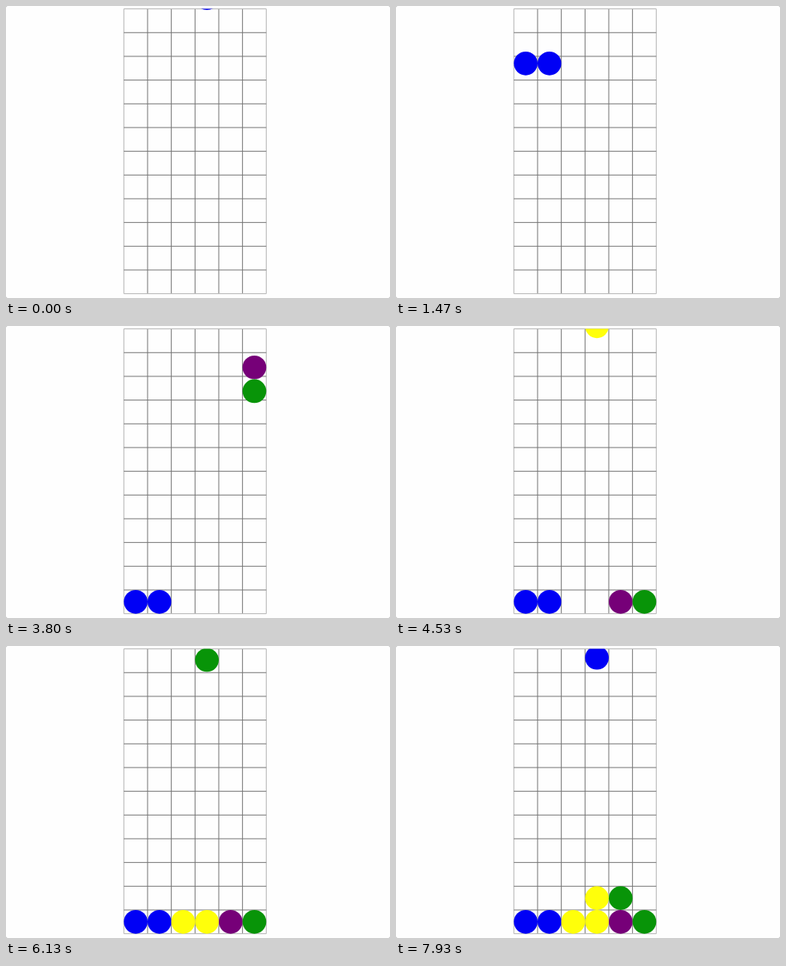
Write an HTML page with a canvas that moves like this. It is 480 px wide and 365 px high and loops after 8 s.

```html
<!DOCTYPE html>
<html lang="en">
<head>
<meta charset="utf-8">
<title>Falling pairs</title>
<style>
  html, body { margin: 0; width: 100%; height: 100%; overflow: hidden; background: #aaa; }
  canvas { display: block; background: #fefefe; border-radius: 2px; }
</style>
</head>
<body>
<canvas id="stage" width="480" height="365"></canvas>
<script>
const ctx = document.getElementById('stage').getContext('2d');
const LOOP = 8000, STEP = 200 / 3;
const COLS = 6, ROWS = 12, CELL = 29.67, LEFT = 147.3, TOP = 3.6;
const FALL = 0.0556, DROP = 1.15; // px per ms
const BLUE = '#0000f5', GREEN = '#089408', PURPLE = '#760078', YELLOW = '#ffff0a';

// The lower disc is the pivot; moves are [time, column, partner turned to the left].
const pairs = [
  { spawn: -27, drop: 1870, row: 11, pivot: BLUE, partner: BLUE,
    moves: [[550, 2, false], [1000, 1, false], [1250, 1, true]] },
  { spawn: 2133, drop: 4090, row: 11, pivot: GREEN, partner: PURPLE,
    moves: [[2650, 2, false], [3000, 3, false], [3300, 4, false], [3600, 5, false], [3980, 5, true]] },
  { spawn: 4325, drop: 5340, row: 11, pivot: YELLOW, partner: YELLOW,
    moves: [[4900, 3, true]] },
  { spawn: 5617, drop: 7230, row: 10, pivot: GREEN, partner: YELLOW,
    moves: [[6400, 4, false], [7050, 4, true]] },
  { spawn: 7466, drop: Infinity, row: 11, pivot: BLUE, partner: BLUE, moves: [] }
];

const centerX = col => LEFT + (col + 0.5) * CELL;
const centerY = row => TOP + (row + 0.5) * CELL;

function line(x1, y1, x2, y2, color) {
  ctx.strokeStyle = color;
  ctx.beginPath();
  ctx.moveTo(x1, y1);
  ctx.lineTo(x2, y2);
  ctx.stroke();
}

function drawGrid() {
  const right = LEFT + COLS * CELL, bottom = TOP + ROWS * CELL;
  const shade = (i, last) => i % last ? '#747474' : '#b4b4b4';
  ctx.lineWidth = 1;
  for (let c = 0; c <= COLS; c++) {
    const x = LEFT + c * CELL;
    line(x, TOP, x, bottom, shade(c, COLS));
  }
  for (let r = 0; r <= ROWS; r++) {
    const y = TOP + r * CELL;
    line(LEFT, y, right, y, shade(r, ROWS));
  }
}

function disc(x, y, color) {
  ctx.fillStyle = color;
  ctx.beginPath();
  ctx.arc(x, y, CELL / 2, 0, Math.PI * 2);
  ctx.fill();
}

function drawPair(pair, time) {
  if (time < pair.spawn) return;
  let col = 3, turned = false;
  for (const [at, toCol, toTurned] of pair.moves) {
    if (time >= at) [col, turned] = [toCol, toTurned];
  }
  const slow = Math.min(time, pair.drop) - pair.spawn;
  const fast = Math.max(0, time - pair.drop);
  const x = centerX(col);
  const y = Math.min(centerY(-1) + slow * FALL + fast * DROP, centerY(pair.row));
  disc(x - (turned ? CELL : 0), y - (turned ? 0 : CELL), pair.partner);
  disc(x, y, pair.pivot);
}

function draw(elapsed) {
  const time = Math.floor((elapsed % LOOP + 4) / STEP) * STEP % LOOP;
  ctx.clearRect(0, 0, 480, 365);
  drawGrid();
  ctx.save();
  ctx.beginPath();
  ctx.rect(LEFT - 1, TOP, COLS * CELL + 2, ROWS * CELL + 1);
  ctx.clip();
  for (const pair of pairs) drawPair(pair, time);
  ctx.restore();
}

const start = performance.now();
function tick() {
  draw(performance.now() - start);
  requestAnimationFrame(tick);
}
tick();
</script>
</body>
</html>
```
